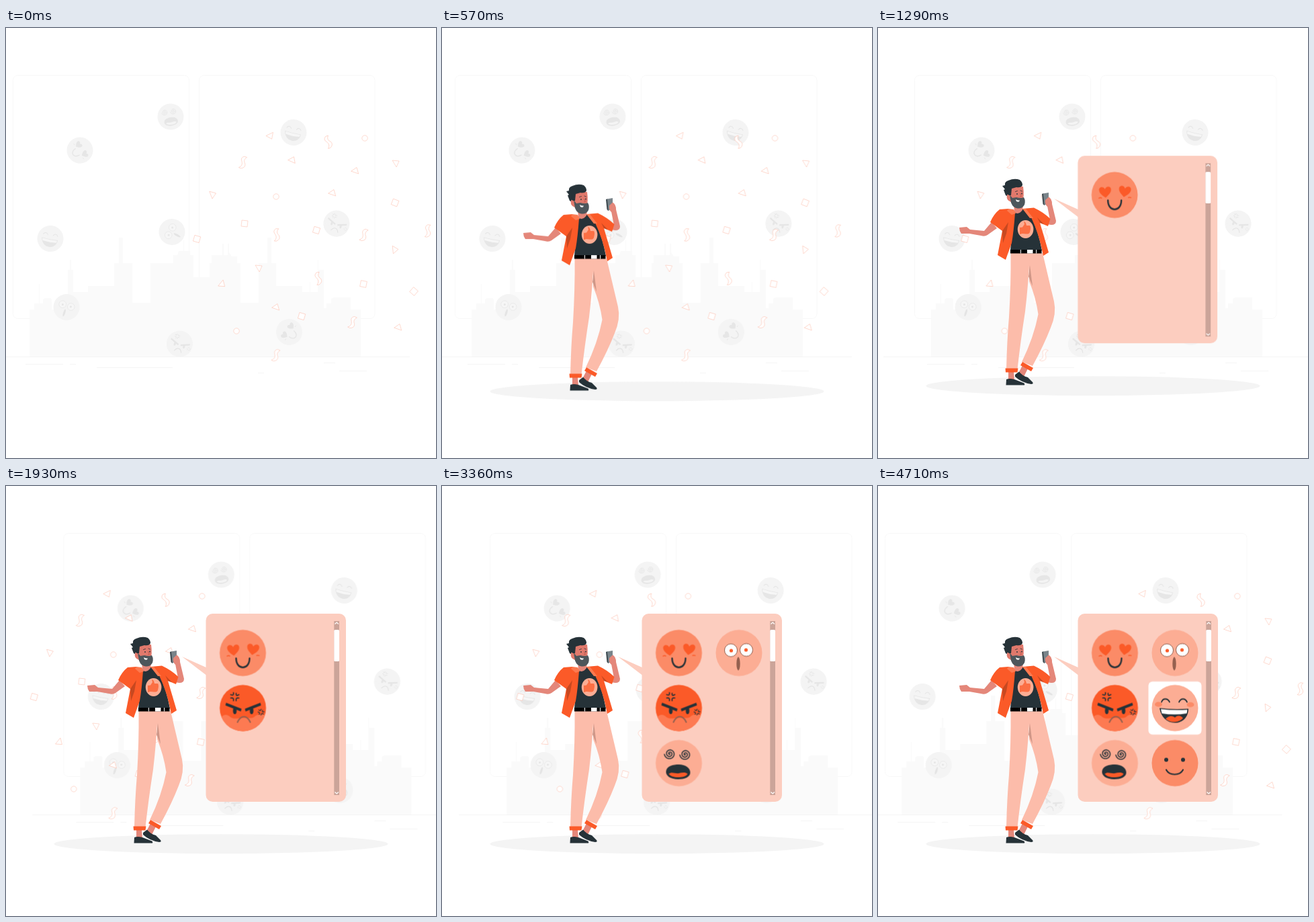
An HTML page for the animation above (4.78 s loop, 640x640 px).

```html
<!DOCTYPE html>
<html lang="en">
<head>
<meta charset="utf-8">
<title>Reactions</title>
<style>
html, body { margin: 0; width: 100%; height: 100%; overflow: hidden; background: #fff; }
svg { display: block; width: 100vw; height: 100vh; }
.big { --ink: #263238; --hot: #fb5a28; --mid: #fb8b67; --pale: #fcad94; --white: #fff; --brown: #95604f; --flush: #fd7a52; }
.grey { --ink: #e6e6e6; --hot: #e6e6e6; --mid: #f4f4f4; --pale: #f4f4f4; --white: #f6f6f6; --brown: #e4e4e4; --flush: #f4f4f4; --anger: #f4f4f4; }
.ink { fill: var(--ink); } .hot { fill: var(--hot); } .mid { fill: var(--mid); }
.pale { fill: var(--pale); } .white { fill: var(--white); }
.line { fill: none; stroke: var(--ink); stroke-linecap: round; }
</style>
</head>
<body>
<svg viewBox="0 0 640 640">
<defs>
  <path id="heart" d="M0 8C-5 4-9 1-9-4C-9-9-2-10 0-4.500C2-10 9-9 9-4C9 1 5 4 0 8Z"/>
  <path id="vein" d="M-6-3Q-1-1-2-6M2-5Q1 0 6-3M6 2Q1 1 2 6M-2 6Q-1 1-6 2" stroke-width="1.700"/>
  <g id="love">
    <circle r="34.500" class="mid"/>
    <use href="#heart" class="hot" transform="translate(-14 -4) rotate(-5)"/>
    <use href="#heart" class="hot" transform="translate(15 -5) rotate(8)"/>
    <path class="line" stroke-width="2.400" d="M-10 8C-10 26 10 26 10 8"/>
    <path d="M-24 5q3-2 5 0M20 4q2-1 5 0" fill="none" stroke="var(--hot)" stroke-width="1.300"/>
  </g>
  <g id="angry">
    <circle r="34.500" fill="var(--anger, var(--hot))"/>
    <path fill="var(--flush)" d="M-32 13C-27 8-22 10-19 13C-14 17-8 15-4 15C4 13 12 17 17 13C22 8 28 10 33 10A34.500 34.500 0 0 1-32 13Z"/>
    <path class="ink" d="M-25-8L-2 1L-3 5L-26-4ZM26-8L3 1L4 5L27-4Z"/>
    <ellipse class="ink" cx="-12" cy="4" rx="2.700" ry="5"/>
    <ellipse class="ink" cx="13" cy="4" rx="2.700" ry="5"/>
    <path d="M-8 21C-3 10 6 10 11 21" fill="none" stroke="var(--brown)" stroke-width="2" stroke-linecap="round"/>
    <use href="#vein" class="line" transform="translate(-12 -17)"/>
    <use href="#vein" class="line" transform="translate(27 6) scale(.7) rotate(20)"/>
  </g>
  <g id="dizzy">
    <circle r="34.500" class="pale"/>
    <path class="line spiral" stroke-width="1.500" transform="translate(-13.500 -14)"/>
    <path class="line spiral" stroke-width="1.500" transform="translate(9.500 -13)"/>
    <path class="ink" d="M-19 12C-18 4-8 2 0 2C10 2 17 7 17 14C17 21 8 24-1 24C-12 24-20 19-19 12Z"/>
    <path fill="var(--anger, var(--hot))" d="M-15 16C-11 12-5 16 0 15C5 14 10 13 13 16C11 20 5 21-1 21C-8 21-13 19-15 16Z"/>
  </g>
  <g id="shock">
    <circle r="34.500" class="pale"/>
    <g class="white" stroke="var(--brown)" stroke-width="1">
      <circle cx="-12" cy="-4" r="9.500"/><circle cx="11" cy="-4.500" r="9.500"/>
    </g>
    <circle cx="-11.500" cy="-3.500" r="2.600" class="hot"/><circle cx="10.500" cy="-4.500" r="2.600" class="hot"/>
    <ellipse cx="-1" cy="16" rx="2.700" ry="10" fill="var(--brown)"/>
  </g>
  <g id="laugh">
    <circle r="34.500" class="pale"/>
    <ellipse cx="-24.500" cy="-5.500" rx="5.500" ry="3.700" class="mid"/><ellipse cx="23" cy="-5" rx="5.500" ry="3.700" class="mid"/>
    <path class="line" stroke-width="1.800" d="M-20-9C-18-15-11-15-8-9M6-9C9-15 15-15 18-9"/>
    <path class="ink" d="M-23 0Q-1 3 20 1C20 14 11 22 0 22C-12 22-21 13-23 0Z"/>
    <path class="white" d="M-21 1.500Q-1 4 18.500 2.500L17.500 8Q-1 11-19.500 8Z"/>
    <path class="hot" d="M-14 16C-9 11-4 11 0 14C4 10 9 11 12 15C6 22-7 23-14 16Z"/>
  </g>
  <g id="smile">
    <circle r="34.500" class="mid"/>
    <circle cx="-13" cy="-5" r="3" class="ink"/><circle cx="12" cy="-5" r="3" class="ink"/>
    <path class="line" stroke-width="2.200" d="M-13 10C-8 19 7 19 12 10"/>
  </g>
  <path id="tri" d="M-5-4L5-3L1 6Z"/>
  <path id="box" d="M-4-5L5-4L4 5L-5 4Z"/>
  <circle id="dot" r="4.200"/>
  <path id="curl" d="M2-9L6-8Q0-4 4 2Q5 8-2 9L-5 8Q1 5-1-1Q-4-7 2-9Z"/>
</defs>

<g id="scene">
  <g fill="none" stroke="#f8f8f8">
    <rect x="10.500" y="70.500" width="262" height="362" rx="7"/>
    <rect x="287.500" y="70.500" width="261.500" height="362" rx="7"/>
  </g>
  <path fill="#fafafa" d="M35 489V419H42V410H49V381H50V410H55V404L58 402H66L68 404V419H92V360H95V345H97V360H100V393H122V384H161V350H168V312H174V350H188V409H215V350H249V338H255L257 332H264V316H265V332H274V338H279V371H303V350H306V338H322V321H324V338H330V321H332V334L336 340H344V350H349V409H376V350H389V312H395V350H402V384H441V393H452V378H453V393H464V345H465V360H473V417H477V410H484V403L488 401H513V419H528V489Z"/>
  <path stroke="#f5f5f5" d="M-36 489.500H601M29 500.500H85M95 500.500H104M135 505.500H248M375 513.500H384M473 498.500H490M496 510.500H537"/>
  <g id="greys" class="grey"></g>
</g>

<g id="confetti" fill="#fff" stroke="#fdb7a3" stroke-width=".5" stroke-linejoin="round"></g>

<g id="bubble" class="big">
  <path fill="#fccdbf" d="M262 254L300 271V283Z"/>
  <rect x="297.500" y="190" width="208.500" height="280" rx="10" fill="#fccdbf"/>
  <rect x="488.300" y="201" width="7.700" height="259" fill="#cba499"/>
  <rect x="488.300" y="214" width="7.700" height="47" rx="1.500" fill="#fff"/>
  <path d="M489.500 205.500l2.700-2.500l2.700 2.500M489.500 455.500l2.700 2.500l2.700-2.500" fill="none" stroke="#fff" stroke-width="1.200"/>
</g>

<g id="man">
  <ellipse cx="320" cy="532.700" rx="248.500" ry="14.500" fill="#f4f4f4"/>
  <g fill="#e4877a">
    <path d="M194 511H202L203 525H194ZM215 502L223 507L217 519L209 514Z"/>
    <path d="M121 297L132 296L137 300L158 302L169 289L177 298L163 308Q159 311 153 309L136 306L124 306Q121 302 121 297Z"/>
    <path d="M242 283L256 286L252 265Q247 262 250 254L253 251Q259 254 259 262L265 287Q265 293 258 293L250 292Z"/>
  </g>
  <path fill="#263238" d="M191 523Q196 521 203 523L216 528Q219 529 218 531.500H190.500ZM204 516L210 511.500Q215 518 223 520L230 527Q232 530 228 530Q214 528 204 519Z"/>
  <path fill="#fcbcaa" d="M225 335H245L262 407Q266 425 257 446Q247 472 230 503L214 497Q232 460 238.500 426Q235 401 225 377Z"/>
  <path fill="#cf9788" d="M226 353L230 384L224 370Z"/>
  <path fill="#fcbcaa" d="M197.500 335H226Q224 380 219 422Q212 467 207.500 508H191Q192 465 195 430Q198 380 197.500 335Z"/>
  <path fill="#fb5a28" d="M189.500 506.500H208.500L207.500 512.500H190ZM215 497L231 506L228 511L212 502Z"/>
  <path fill="#263238" d="M202 275L217 269L228 281Q239 303 244 331H197Z"/>
  <path d="M197 330H243.500V335.500H197Z"/>
  <path fill="#fff" d="M222 330H230.500V335.500H222ZM212 330h1v5.500h-1ZM235 330h1v5.500h-1Z"/>
  <ellipse cx="219.600" cy="299.500" rx="11.800" ry="13.500" fill="#fcad94"/>
  <path fill="#fb6f44" d="M211 297L215 296.500L218 292L217 288Q220 288 221 294L226 294Q228 296 226 304Q225 307 220 306.500L215 306L211 307Z"/>
  <path fill="#e4877a" d="M202 262L216 264L215 271Q209 279 203 274Z"/>
  <path fill="#fb5a28" d="M194 269L204 275Q202 303 199 320L190 345L178 338L185 302L167 289Q172 277 181 270Z"/>
  <path fill="#fb5a28" d="M215 269L232 267.500Q246 274 256.500 284L253 295L241 290L254 334L246 339Q240 307 228 282Z"/>
  <path fill="#c74820" d="M185 302L194 289L191 306L186 320ZM241 290L237 282L247 292Z"/>
  <path fill="#fd7a50" d="M194 269L202 270L205 276L199 278L192 272ZM215 269L220 269L231 283L226 283Z"/>
  <path fill="#e0796c" d="M192 249Q190 256 198 259L202 264L215 260Q218 250 216 236L200 234Z"/>
  <path fill="#4d565b" d="M196 248L200 253L206 252Q213 254 217 252Q220 257 218 263Q215 269 208 268.500Q201 268 198 260Z"/>
  <path fill="#fff" d="M205 255Q208 257 211 256.500Q210 260 206 258Z"/>
  <path fill="#263238" d="M190 249L187 241L189 240L185 235L189 234Q188 229 194 227Q203 223 211 226Q215 229 215 234Q213 238 206 237L199 239L198 249L195 249Q192 246 192 250Z"/>
  <path fill="none" stroke="#263238" stroke-width=".8" stroke-linecap="round" d="M204.500 243.500L207.500 242.500M212 242L214.500 243"/>
  <path fill="none" stroke="#b84c42" stroke-width=".7" d="M211.500 246L213.500 250.500L211 251"/>
  <circle cx="207" cy="247" r=".9" fill="#263238"/><circle cx="214" cy="246.500" r=".9" fill="#263238"/>
  <path fill="#79848a" d="M245 246.500L254 245L254 261L247 264Z"/>
  <path fill="#3a464c" d="M244 247L246 246.500L247.500 264L245.500 262Z"/>
  <path fill="#e4877a" d="M249 256L254 251.500Q259 255 259 263L252 266Q248 262 249 256Z"/>
</g>
</svg>
<script>
const NS = 'http://www.w3.org/2000/svg';
const LOOP = 4780;
const EXPO = 'cubic-bezier(.19,1,.22,1)';
const get = id => document.getElementById(id);

function add(parent, tag, attrs = {}) {
  const el = document.createElementNS(NS, tag);
  for (const key in attrs) el.setAttribute(key, attrs[key]);
  return parent.appendChild(el);
}
const place = (parent, id, x, y, turn = 0, size = 1) =>
  add(parent, 'use', { href: '#' + id, transform: `translate(${x} ${y}) rotate(${turn}) scale(${size})` });

// Archimedean spiral for the dizzy eyes
let curve = 'M0 0';
for (let a = 0.4; a < 15.7; a += 0.4) {
  const r = a * 0.52;
  curve += `L${(r * Math.cos(a)).toFixed(2)} ${(r * Math.sin(a)).toFixed(2)}`;
}
document.querySelectorAll('.spiral').forEach(p => p.setAttribute('d', curve));

[
  ['dizzy', 245, 132, -10], ['love', 110, 182, 58], ['laugh', 428, 155.5, 12],
  ['laugh', 66, 313.5, 10], ['shock', 247, 303.5, -61], ['angry', 492, 291, 20],
  ['shock', 90, 415.5, 18], ['angry', 258.5, 470, 18], ['love', 421.5, 452.5, -52]
].forEach(([id, x, y, turn]) => place(get('greys'), id, x, y, turn, 0.565));

const bits = {
  tri: [[394, 160, 95], [427, 197, -35], [521, 213, -40], [581, 201, 0], [308, 248, 10], [487, 246, -40],
    [579, 330, 25], [377, 357, 0], [322, 381, 70], [403, 416, -40], [585, 446, -40]],
  box: [[580, 260, 15], [356, 291, 0], [285, 314, 10], [463, 301, 10], [533, 381, 5], [608, 392, 35], [441, 429, 10]],
  dot: [[535, 164], [403, 251], [344, 451]],
  curl: [[480, 170, -35], [353, 200, 4], [403, 308, -15], [533, 308, 8], [628, 302, -8],
    [465, 373, -25], [516, 438, 10], [402, 487, 8]]
};
for (const id in bits) bits[id].forEach(([x, y, turn]) => place(get('confetti'), id, x, y, turn));

const play = (el, frames, delay = 0) => el.animate(frames, { duration: LOOP, iterations: Infinity, delay });

// Sway sideways and back
function sway(el, dist, delay) {
  const home = { transform: 'translateX(0)', easing: 'ease-in-out' };
  play(el, [home, { transform: `translateX(${dist}px)`, offset: 0.53, easing: 'ease-in-out' }, home], delay);
}

// Hold one pose, move to rest, stay there until the loop restarts
function enter(el, from, to, start, length) {
  play(el, [
    { transform: from, offset: 0 },
    { transform: from, offset: start / LOOP, easing: EXPO },
    { transform: to, offset: (start + length) / LOOP },
    { transform: to, offset: 1 }
  ]);
}
const pop = (el, start, length) => enter(el, 'scale(0)', 'scale(1)', start, length);

function popSpot(x, y, start) {
  const spot = add(add(get('bubble'), 'g', { transform: `translate(${x} ${y})` }), 'g');
  pop(spot, start, 400);
  return spot;
}

sway(get('scene'), 85.3, 0);
sway(get('confetti'), -263.5, -110);
enter(get('man'), 'translateY(640px)', 'translateY(0)', 0, 1010);
get('bubble').style.transformOrigin = '262px 254px';
pop(get('bubble'), 602, 1000);

add(popSpot(442, 330.5, 4350), 'rect', { x: -39.5, y: -39.5, width: 79, height: 79, rx: 6, fill: '#fff' });
['love', 'angry', 'dizzy', 'shock', 'laugh', 'smile'].forEach((id, i) => {
  const x = i < 3 ? 352.5 : 442;
  const y = 248.5 + 82 * (i % 3);
  place(popSpot(x, y, 880 + 660 * i), id, 0, 0);
});
</script>
</body>
</html>
```
